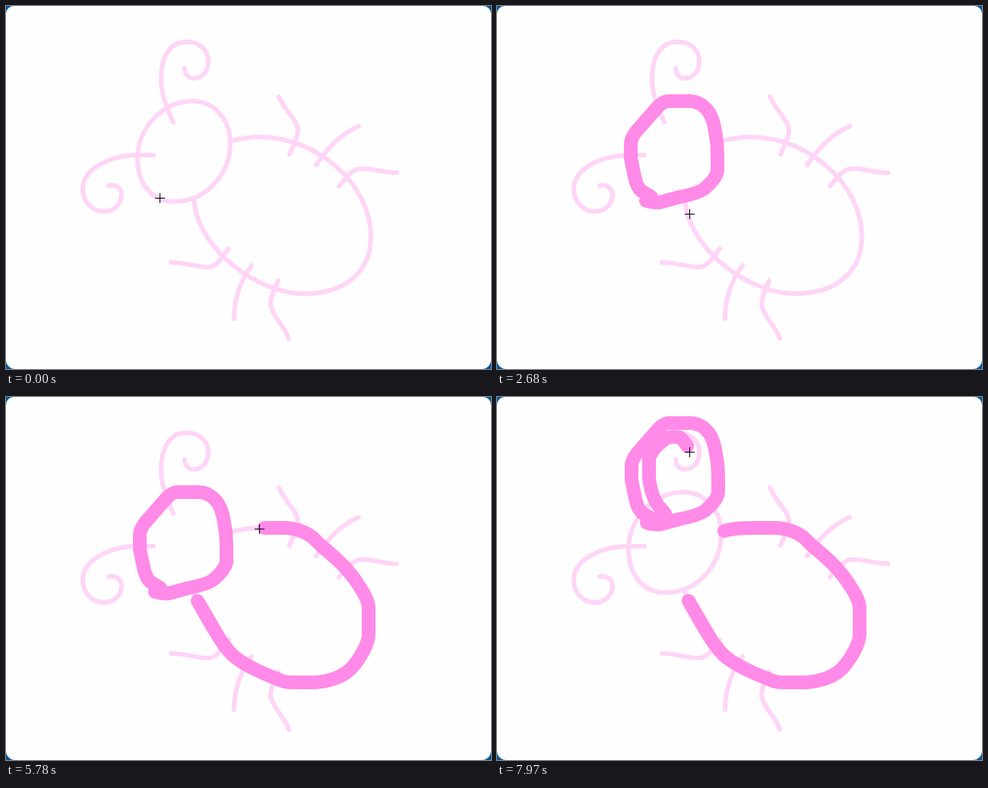
An HTML page that plays this animation: 638x477 px, repeating every 8000 ms.

```html
<!DOCTYPE html>
<html lang="en">
<head>
<meta charset="utf-8">
<title>Tracing a bug</title>
<style>
  html, body { margin: 0; width: 100%; height: 100%; overflow: hidden; background: #00589c; }
  svg { display: block; border-radius: 10px 10px 12px 12px; background: #fefefe; }
  path { fill: none; stroke-linecap: round; stroke-linejoin: round; }
  #guide { stroke: #ffd5f7; stroke-width: 6; }
  .ink { stroke: #ff8ae8; stroke-width: 18; }
  .hover { stroke: none; }
  #cursor { stroke: #000; stroke-linecap: butt; shape-rendering: crispEdges; }
</style>
</head>
<body>
<svg width="638" height="477">
  <path id="guide" d="
    M245 125C275 125 295 150 295 180C295 222 262 257 222 257C190 257 173 232 173 200C173 160 207 125 245 125Z
    M297 177C310 174 320 172 333 172C410 172 480 235 480 303C480 350 445 378 393 378C330 378 253 320 247 255
    M220 153C210 130 204 115 204 95C204 68 215 47 237 47C254 47 266 57 266 73C266 86 258 95 247 95C240 95 235 90 235 82
    M194 196H175C135 196 101 215 101 240C101 257 113 270 129 270C142 270 152 260 152 248C152 240 145 234 135 236
    M359 119C368 140 384 150 384 164C383 175 378 183 373 195
    M464 158C440 168 422 188 408 209
    M514 219C492 219 476 211 464 214C453 217 446 227 438 237
    M217 337C237 337 255 344 268 343C279 341 284 329 293 319
    M300 411C300 385 307 363 323 341
    M358 361C353 373 348 382 348 393C350 407 366 420 372 437"/>
  <path id="head" class="ink" d="M203 251L190 243Q184 238 181 224L176 200V181Q176 174 183 165L212 132
    Q219 125 226 125H253Q266 125 275 135Q284 144 287 165Q290 180 290 195V217Q288 227 274 239
    Q266 246 240 251L214 258Q206 259 196 256"/>
  <path id="toBody" class="hover" d="M196 256L257 273L252 268"/>
  <path id="body" class="ink" d="M252 268L276 309Q286 327 298 339Q314 354 358 371Q366 375 376 375H408
    Q432 373 448 362Q460 353 471 332Q477 320 477 312V276Q476 266 467 252Q457 236 447 225
    Q436 213 414 195L403 184Q388 173 368 172H340Q312 172 299 176"/>
  <path id="toAntenna" class="hover" d="M299 176L221 153"/>
  <path id="antenna" class="ink" d="M221 153L213 144Q205 134 201 114L200 106V80Q204 69 216 59
    Q226 50 240 53Q246 56 254 71"/>
  <path id="cursor" d="M-6 .5H7M.5 -6V7"/>
</svg>
<script>
const LOOP = 8000;
const CURSOR_LEAD = 50; // the ink trails the pointer
const ANTENNA_TOP = 0.81; // part of the antenna drawn when its tip is highest
const byId = id => document.getElementById(id);

// Each stroke: time of the first dot, then [time, part of the path done].
function makeStroke(id, appears, ...keys) {
  const path = byId(id);
  return { path, appears, keys, length: path.getTotalLength() };
}
const head = makeStroke('head', 120, [260, 0], [2280, 1]);
const toBody = makeStroke('toBody', 2490, [2490, 0], [2770, 1]);
const body = makeStroke('body', 2840, [3100, 0], [4450, 0.495], [5780, 0.927], [6110, 1]);
const toAntenna = makeStroke('toAntenna', 6580, [6580, 0], [6970, 1]);
const antenna = makeStroke('antenna', 6975, [7020, 0], [8020, 1]);
const strokes = [head, toBody, body, toAntenna, antenna];

function progress({ keys }, time) {
  const next = keys.findIndex(([t]) => t > time);
  if (next === 0) return 0;
  if (next < 0) return 1;
  const [t0, p0] = keys[next - 1];
  const [t1, p1] = keys[next];
  return p0 + (p1 - p0) * (time - t0) / (t1 - t0);
}

const pointOn = ({ path, length }, part) => path.getPointAtLength(length * part);

// The head outline is pushed along by whichever pen tip touches it.
function headShift(time) {
  const inner = pointOn(antenna, Math.min(progress(antenna, time), ANTENNA_TOP));
  if (inner.y < 144) return [Math.min(1, inner.x - 225), inner.y - 143];
  const push = Math.max(0, 307 - pointOn(body, progress(body, time)).x);
  return time > body.keys[0][0] + 2000 ? [-push, push / 8] : [0, 0];
}

function drawInk(stroke, time) {
  const drawn = Math.max(0.01, stroke.length * progress(stroke, time));
  stroke.path.style.visibility = time < stroke.appears ? 'hidden' : 'visible';
  stroke.path.style.strokeDasharray = `${drawn} 9999`;
}

function placeCursor(time) {
  const current = strokes.findLast(stroke => stroke.appears <= time) ?? head;
  const tip = pointOn(current, progress(current, time));
  byId('cursor').setAttribute('transform',
    `translate(${Math.round(tip.x) - 1} ${Math.round(tip.y) + 1})`);
}

function draw(now) {
  const time = now % LOOP;
  [head, body, antenna].forEach(stroke => drawInk(stroke, time));
  head.path.setAttribute('transform', `translate(${headShift(time)})`);
  placeCursor(time + CURSOR_LEAD);
}

let start;
function tick(now) {
  start ??= now;
  draw(now - start);
  requestAnimationFrame(tick);
}
draw(0);
requestAnimationFrame(tick);
</script>
</body>
</html>
```
